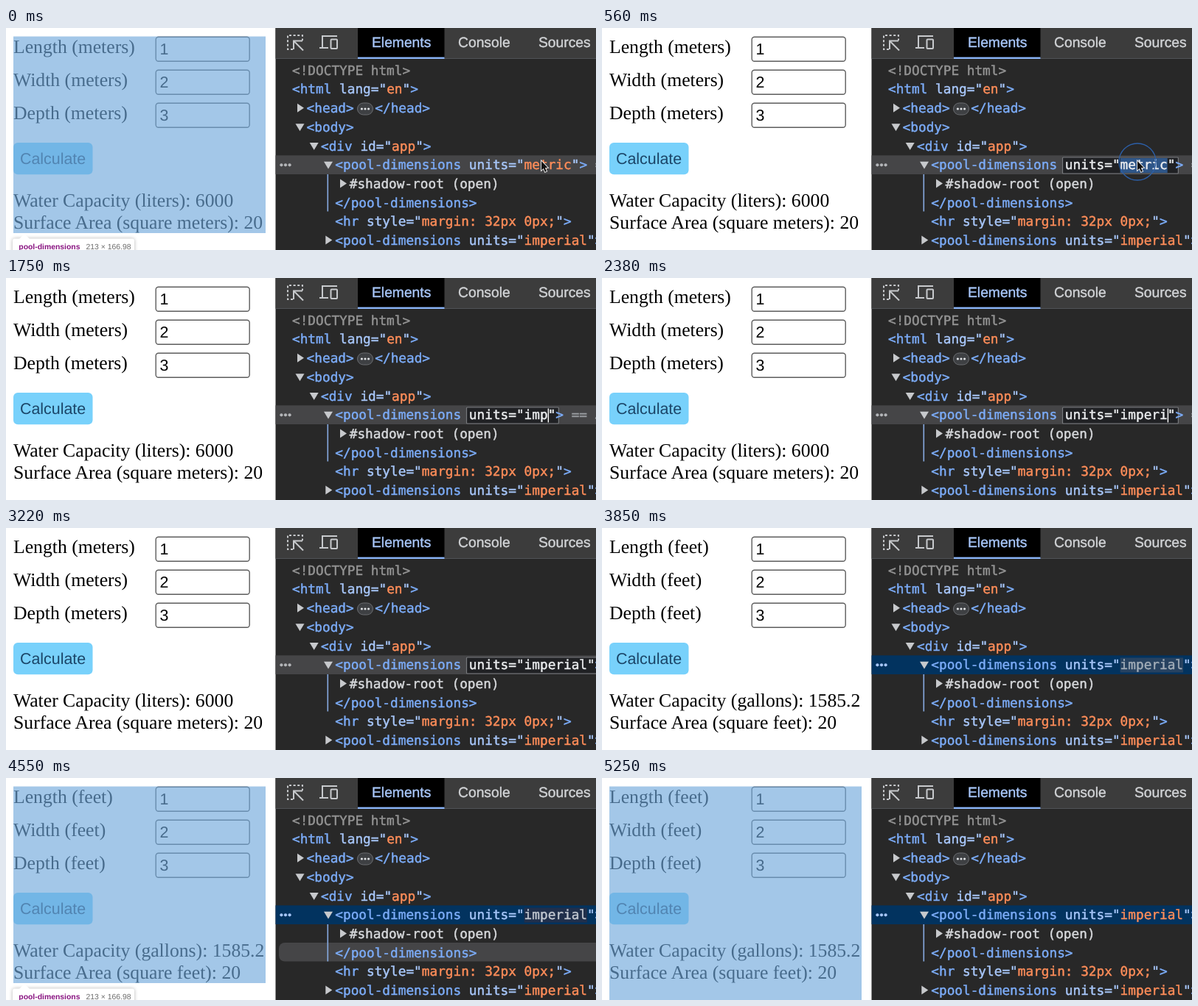
Animation, 800 px wide and 302 px high, one loop 5320 ms. Source, as an HTML page with a canvas:

```html
<!DOCTYPE html>
<html lang="en">
<head>
<meta charset="utf-8">
<title>Pool dimensions</title>
<style>
html, body { margin: 0; width: 100%; height: 100%; overflow: hidden; background: #fff; }
canvas { display: block; }
</style>
</head>
<body>
<canvas id="stage" width="800" height="302"></canvas>
<script>
const ctx = document.getElementById('stage').getContext('2d');
ctx.textRendering = 'geometricPrecision';

const LOOP = 5320, STEP = 70;
const SERIF = '25.7px "Liberation Serif", Times, serif';
const SANS = 'px "Liberation Sans", Arial, sans-serif';
const FIELD = '21.4' + SANS, TAB = '19.27' + SANS, TIP = '10.4' + SANS;
const MONO = '17.74px "DejaVu Sans Mono", Menlo, monospace';
const CH = 10.68, LINE = 25.68, FIRST = 63.8, EDGE = 365.5;
const UNITS_X = 446.3 + 17 * CH;
const C = {
  tag: '#7cacf8', attr: '#a8c7fa', value: '#fe8d59', plain: '#d8dadd',
  dim: '#949494', panel: '#282828', bar: '#3c3c3c', hover: '#454547', pick: '#02335f'
};

// Moments of the interaction
const EDIT = 350, RING = [280, 700], COMMIT = 3570, HOVER = 4550, LEAVE = 4760;
const KEYS = [1190, 1470, 1680, 1960, 2100, 2310, 2450, 2660];
const FLASH = 1400;

// weight > 0 thickens the strokes of the letters
function text(str, x, y, font, color, weight = 0) {
  ctx.font = font;
  ctx.fillStyle = color;
  ctx.fillText(str, x, y);
  if (weight) {
    ctx.strokeStyle = color;
    ctx.lineWidth = weight;
    ctx.strokeText(str, x, y);
  }
}

function rect(x, y, w, h, color) {
  ctx.fillStyle = color;
  ctx.fillRect(x, y, w, h);
}

function round(x, y, w, h, r, fill, stroke, width = 1) {
  ctx.beginPath();
  ctx.roundRect(x, y, w, h, r);
  if (fill) { ctx.fillStyle = fill; ctx.fill(); }
  if (stroke) { ctx.strokeStyle = stroke; ctx.lineWidth = width; ctx.stroke(); }
}

function poly(points, fill, stroke, width = 1) {
  ctx.beginPath();
  points.forEach(([x, y]) => ctx.lineTo(x, y));
  ctx.closePath();
  if (stroke) { ctx.strokeStyle = stroke; ctx.lineWidth = width; ctx.stroke(); }
  ctx.fillStyle = fill;
  ctx.fill();
}

function line(points) {
  ctx.beginPath();
  points.forEach(([x, y]) => ctx.lineTo(x, y));
  ctx.stroke();
}

function dots(x, y, gap, r, color) {
  ctx.fillStyle = color;
  for (let i = -1; i <= 1; i++) {
    ctx.beginPath();
    ctx.arc(x + i * gap, y, r, 0, 7);
    ctx.fill();
  }
}

const mix = (a, b, k) => `rgb(${a.map((v, i) => v + (b[i] - v) * k)})`;

// Code line from [text, color] parts
function code(row, x, parts) {
  for (const [str, color, style = ''] of parts) {
    text(str, x, FIRST + row * LINE, style + MONO, color, 0.45);
    x += str.length * CH;
  }
}

const tag = (name, attr, value) => attr
  ? [['<' + name + ' ', C.tag], [attr + '="', C.attr], [value, C.value], ['"', C.attr], ['>', C.tag]]
  : [['<' + name + '>', C.tag]];

function arrow(x, row, open) {
  const y = FIRST + row * LINE - 6.5;
  poly(open ? [[x - 6, y - 4], [x + 6, y - 4], [x, y + 6]]
            : [[x - 4, y - 6], [x + 5, y], [x - 4, y + 6]], '#c7c9cc');
}

function form(t) {
  const metric = t < COMMIT;
  const unit = metric ? 'meters' : 'feet';
  ['Length', 'Width', 'Depth'].forEach((name, i) => {
    const y = i * 45;
    text(`${name} (${unit})`, 10, 34.2 + y, SERIF, '#000');
    round(203.2, 12.2 + y, 127, 33, 3.5, '#fff', '#5c5c5c', 1.4);
    text(i + 1, 208.5, 35.8 + y, FIELD, '#000');
  });
  round(10, 156, 107.5, 43.2, 6, '#78d1fb');
  text('Calculate', 19, 184.6, FIELD, '#1b4568');
  text(`Water Capacity (${metric ? 'liters' : 'gallons'}): ${metric ? '6000' : '1585.2'}`, 10, 242.7, SERIF, '#000');
  text(`Surface Area (square ${unit}): 20`, 10, 272.7, SERIF, '#000');

  const tip = t < EDIT || (t >= HOVER && t < LEAVE);
  if (tip || t >= LEAVE) rect(10, 11.5, 342, tip ? 267.5 : 291, 'rgba(111,168,220,0.64)');
  if (tip) tooltip();
}

function tooltip() {
  ctx.save();
  ctx.shadowColor = 'rgba(0,0,0,0.3)';
  ctx.shadowBlur = 5;
  round(9, 286.5, 165, 30, 3, '#fff');
  ctx.restore();
  poly([[17, 288], [25, 280], [33, 288]], '#fff');
  text('pool-dimensions', 17.3, 301, 'bold ' + TIP, '#881280');
  text('213 × 166.98', 108.5, 301, TIP, '#6a6a6a');
}

function toolbar() {
  rect(EDGE, 0, 435, 41, C.bar);
  rect(EDGE, 41, 435, 1, '#505256');
  rect(477, 0, 117.5, 41, '#000');
  rect(477, 39.6, 117.5, 2.4, '#8ab4f8');

  ctx.strokeStyle = '#c7c9cc';
  ctx.lineWidth = 2;
  ctx.setLineDash([3, 2.6]);
  line([[389, 29], [382, 29], [382, 10], [402, 10], [402, 17]]);
  ctx.setLineDash([]);
  line([[402, 17.5], [390, 17.5], [390, 29]]);
  line([[390, 17.5], [403, 30.5]]);
  line([[449, 11], [429, 11], [429, 26]]);
  line([[425, 27], [437, 27]]);
  round(440.5, 15.5, 8.5, 12.5, 1, null, '#c7c9cc', 2);

  text('Elements', 496, 26.2, TAB, C.attr, 0.4);
  text('Console', 613, 26.2, TAB, '#d2d4d7', 0.4);
  text('Sources', 722, 26.2, TAB, '#d2d4d7', 0.4);
}

function selectedRow(t) {
  const done = t >= COMMIT, editing = t >= EDIT && !done;
  const typed = KEYS.filter(k => k <= t);
  const value = typed.length ? 'imperial'.slice(0, typed.length) : 'metric';
  const valueX = UNITS_X + 7 * CH, valueW = value.length * CH;
  const end = UNITS_X + (value.length + 8) * CH;

  rect(EDGE, 173.3, 435, 25.7, done ? C.pick : C.hover);
  dots(379, 186.3, 5.6, 2.1, done ? C.attr : '#b4b6b9');
  rect(435.5, 199, 1.6, 50.5, '#86aae0');

  const marked = done && t < LEAVE;
  const fade = (t - COMMIT) / FLASH;
  if (editing) {
    round(624.5, 176, end + 4 - 624.5, 22, 1, '#202124', '#77797c', 1.2);
    if (!typed.length) rect(valueX, 177, valueW, 20, '#2f5688');
  }
  if (marked) rect(valueX, 176.5, valueW, 20, mix([42, 74, 104], [27, 36, 62], fade));

  const ink = editing ? '#eceef0' : C.attr;
  const valueInk = editing ? ink : marked ? mix([150, 162, 174], [212, 215, 222], fade) : C.value;
  code(5, 446.3, [
    ['<pool-dimensions ', C.tag],
    ['units="', ink], [value, valueInk], ['"', ink],
    ['>', C.tag],
    [' == $0', '#989b9f', 'italic ']
  ]);
  arrow(437, 5, true);

  if (editing && typed.length && (t - typed.at(-1)) % 1000 < 500) {
    rect(valueX + valueW, 177.5, 1.4, 19, '#fff');
  }
}

function pointer(t) {
  if (t >= RING[0] && t < RING[1]) {
    ctx.beginPath();
    ctx.arc(726, 182, 25, 0, 7);
    ctx.strokeStyle = '#2c5fa8';
    ctx.lineWidth = 1.3;
    ctx.stroke();
  }
  if (t < KEYS[0]) {
    poly([[726, 181], [726, 193.5], [728.8, 191], [731, 195.8], [733, 194.9], [730.9, 190.2], [734.6, 190]],
      '#111', '#f2f2f2', 1.8);
  }
}

function inspector(t) {
  rect(EDGE, 0, 435, 302, C.panel);
  toolbar();
  code(0, 388, [['<!DOCTYPE html>', C.dim]]);
  code(1, 388, tag('html', 'lang', 'en'));
  arrow(399, 2, false);
  code(2, 407.6, tag('head'));
  round(476.5, 102, 21, 16, 8, '#3e4043', '#6a6c70');
  dots(487, 110, 4.6, 1.6, '#dfe1e4');
  code(2, 500.3, tag('/head'));
  arrow(398.5, 3, true);
  code(3, 407.6, tag('body'));
  arrow(417.7, 4, true);
  code(4, 427, tag('div', 'id', 'app'));
  if (t >= HOVER && t < LEAVE) round(370, 224, 445, 25.5, 8, C.hover);
  selectedRow(t);
  arrow(457, 6, false);
  code(6, 465.7, [['#shadow-root (open)', C.plain]]);
  code(7, 446.3, tag('/pool-dimensions'));
  code(8, 446.3, tag('hr', 'style', 'margin: 32px 0px;'));
  arrow(437.3, 9, false);
  code(9, 446.3, tag('pool-dimensions', 'units', 'imperial'));
  pointer(t);
}

function draw(now) {
  const t = Math.floor((now % LOOP) / STEP) * STEP;
  rect(0, 0, 800, 302, '#fff');
  form(t);
  inspector(t);
}

const start = performance.now();
function tick() {
  draw(performance.now() - start);
  requestAnimationFrame(tick);
}
tick();
</script>
</body>
</html>
```
